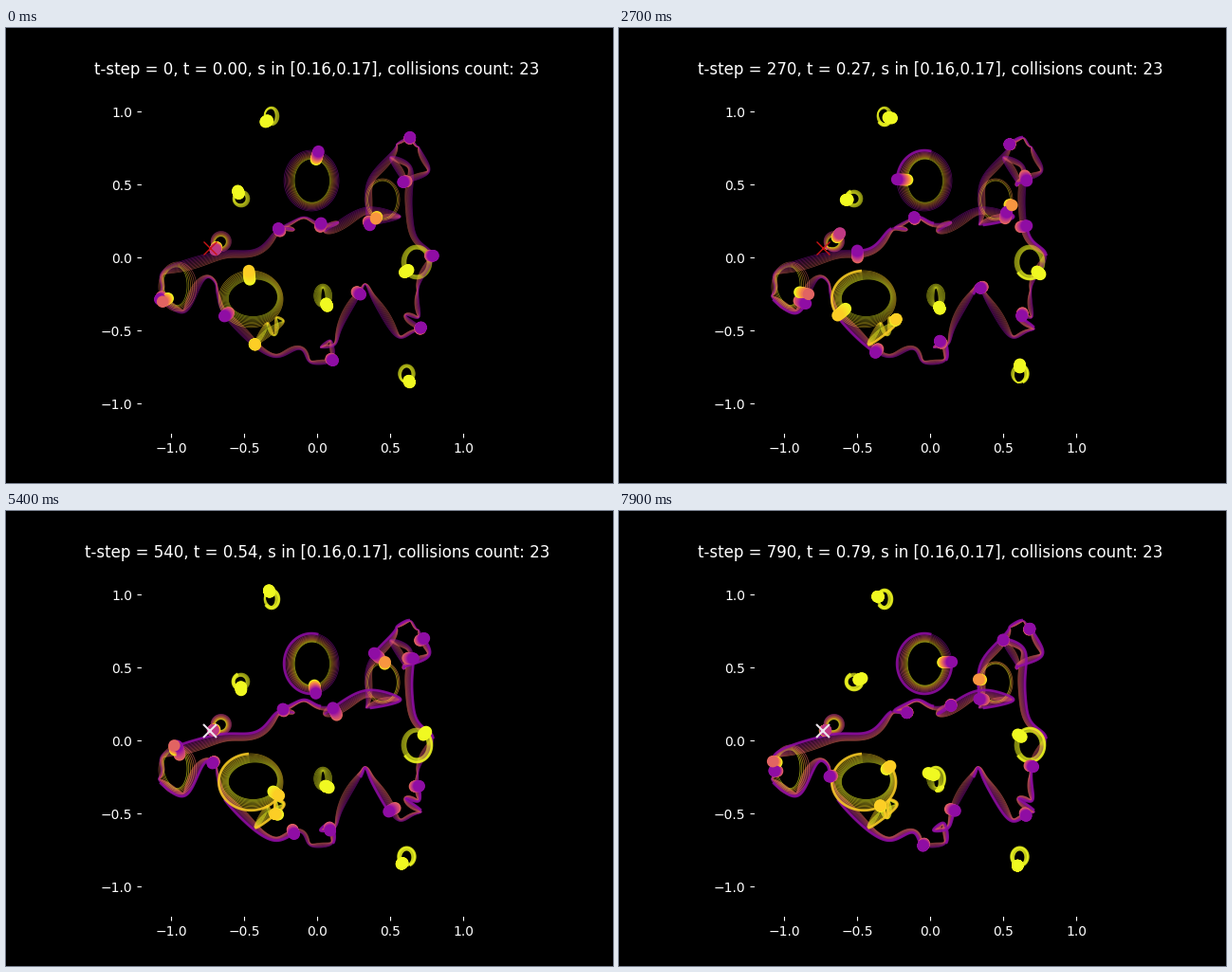
These frames come from a looping animation (640x480 px, 8 s). A matplotlib script:

```python
import numpy as np
import matplotlib.pyplot as plt
from matplotlib.animation import FuncAnimation
from matplotlib.collections import LineCollection

FRAMES, STEPS, SUB = 80, 200, 2
RED_UNTIL = 40
cmap = plt.get_cmap("plasma")


def plane(p):
    """Stage pixels, as x + y j, to the complex plane."""
    return np.conj((np.asarray(p) - (328 + 242.4j)) / 154)


def spline(points):
    """Closed Catmull-Rom curve, five key points per unit of time."""
    u = np.arange(STEPS // 5) * 5 / STEPS
    p = plane(points)[:, None]
    q, m = np.roll(p, -1), (np.roll(p, -1) - np.roll(p, 1)) / 2
    n = np.roll(m, -1)
    return (p + u * m + u**2 * (3 * (q - p) - 2 * m - n)
            + u**3 * (2 * (p - q) + m + n)).ravel()


def ellipse(center, rx, ry, start, lead=0):
    """One turn from the angle start, running ahead by lead midway."""
    t = np.arange(STEPS) / STEPS
    a = np.radians(start + 360 * t + lead * np.sin(np.pi * t) ** 2)
    return plane(center) + (rx * np.cos(a) + 1j * ry * np.sin(a)) / 154


paths, values, ranks = [], [], []


def family(z, n, depth, c0, c1):
    """Roots riding the loop z(t), continued to the nested loops z(t + i d)."""
    turns = len(z) // STEPS
    freq = np.fft.fftfreq(len(z), 1 / STEPS)
    spectrum = np.fft.fft(z) * np.exp(-(freq / 5) ** 4)
    for k, f in enumerate(np.linspace(0, 1, n)):
        damp = np.exp(-2 * np.pi * np.clip(freq, -12, 12) * depth * f)
        w = np.fft.ifft(spectrum * damp)
        w = np.append(w, w[0])
        for j in range(turns):
            part = w[j * STEPS:(j + 1) * STEPS + 1]
            paths.append(np.column_stack([part.real, part.imag]))
            values.append(c0 + f * (c1 - c0))
            ranks.append(k)


# one long cycle: each row is the way from one root to the next
CHAIN = [
    451+240j, 433+220j, 428+184j, 428+146j, 404+136j,
    419+163j, 421+164j, 447+152j, 437+128j, 433+124j,
    426+115j, 413+121j, 408+129j, 381+161j, 380+200j,
    383+208j, 417+199j, 378+189j, 336+214j, 351+205j,
    332+206j, 316+199j, 303+203j, 290+211j, 304+213j,
    287+211j, 264+233j, 222+236j, 167+254j, 164+275j,
    162+286j, 189+301j, 209+266j, 220+269j, 222+281j,
    230+304j, 261+336j, 286+348j, 310+339j, 321+354j,
    345+351j, 343+329j, 331+337j, 347+335j, 355+315j,
    374+281j, 379+271j, 387+289j, 411+326j, 430+321j,
    438+316j, 421+303j, 436+306j, 435+283j, 437+269j,
]
family(spline(CHAIN), 10, .035, .3, .62)
family(spline([262+335j, 293+312j, 284+305j, 283+324j, 275+310j]), 8, .03, .9, 1)

# pods
family(ellipse(322+161j, 29, 32, 75, 10), 10, .06, .3, 1)
family(ellipse(258+286j, 34, 30, 93, 45), 10, .05, .9, 1)
family(ellipse(181+273j, 20, 26, 217, 50), 6, .05, .6, 1)
family(ellipse(397+181j, 18, 22, 247), 3, .02, .75, .95)

# small closed loops
family(ellipse(280+93j, 8, 10, 217, 60), 10, .05, 1, 1)
family(ellipse(248+180j, 9, 9, 114, -40), 10, .07, 1, 1)
family(ellipse(227+225j, 11, 11, 234, 150), 10, .05, .45, 1)
family(ellipse(422.5+364.5j, 9, 10, 290, 110), 10, .04, 1, 1)
family(ellipse(433+247j, 16, 18, 217), 10, .05, 1, 1)
family(ellipse(334+282j, 10, 13, 300, -190), 10, .05, 1, 1)

paths, values, ranks = np.array(paths), np.array(values), np.array(ranks)
order = np.argsort(-ranks, kind="stable")
paths, values, ranks = paths[order], values[order], ranks[order]
colors = cmap(values)
lead = (ranks == 0) & (abs(values - .6) > .2)

plt.rcParams["font.family"] = "DejaVu Sans"
fig = plt.figure(figsize=(6.4, 4.8), dpi=100, facecolor="black")
ax = fig.add_subplot(facecolor="black")
ax.set(xlim=(-1.2, 1.2), ylim=(-1.2, 1.2), aspect="equal",
       xticks=np.arange(-1, 1.1, .5), yticks=np.arange(-1, 1.1, .5))
ax.tick_params(colors="white")
title = ax.set_title("", color="white")

ax.add_collection(LineCollection(paths, colors=colors, linewidths=.5, alpha=.55))
faint = LineCollection([], colors=colors[~lead], linewidths=.8, alpha=.18, zorder=3)
bold = LineCollection([], colors=colors[lead], linewidths=1.9, alpha=.85, zorder=4)
ax.add_collection(faint)
ax.add_collection(bold)
dots = ax.scatter(*paths[:, 0].T, s=81, c=colors, linewidths=0, zorder=5)
spot = plane(214.5 + 232j)
cross, = ax.plot(spot.real, spot.imag, "x", ms=10, zorder=6)


def update(frame):
    step, i = 10 * frame, SUB * frame
    title.set_text(f"t-step = {step}, t = {step / 1000:.2f}, "
                   "s in [0.16,0.17], collisions count: 23")
    faint.set_segments(paths[~lead, :i + 1])
    bold.set_segments(paths[lead, :i + 1])
    dots.set_offsets(paths[:, i])
    red = frame < RED_UNTIL
    cross.set(color="#c81414" if red else "#ece4ec",
              markeredgewidth=1 if red else 1.5)
    return title, faint, bold, dots, cross


anim = FuncAnimation(fig, update, frames=FRAMES, interval=100,
                     repeat=True, repeat_delay=0, blit=False)
plt.show()
```
